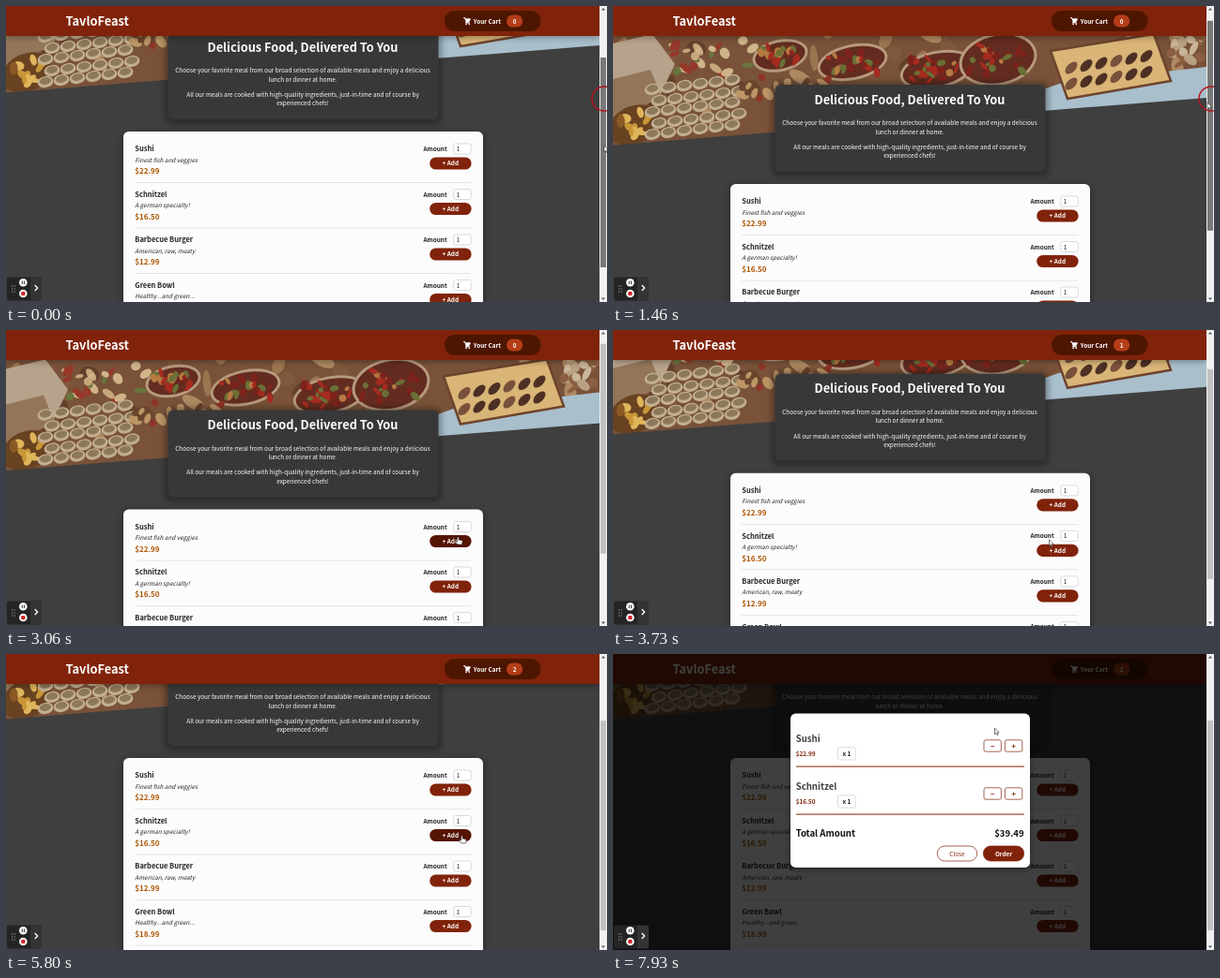
Animation of 640x316 px, one loop 8000 ms. Source, as an HTML page:

```html
<!DOCTYPE html>
<html lang="en">
<head>
<meta charset="utf-8">
<title>Food order</title>
<style>
html, body { margin: 0; width: 100%; height: 100%; overflow: hidden; background: #3f3f3f; }
svg { display: block; width: 100vw; height: 100vh; }
text { font: 6.4px "Noto Sans CJK JP", "Noto Sans CJK SC", "Noto Sans CJK", "Noto Sans", sans-serif; white-space: pre; }
.b { font-weight: 700; }
.i { font-style: italic; }
.mid { text-anchor: middle; }
.end { text-anchor: end; }
</style>
</head>
<body>
<svg id="stage" viewBox="0 0 640 316">
  <defs>
    <clipPath id="photoClip"><path d="M0-230H632V-92L0-41.5Z"/></clipPath>
    <filter id="soft" x="-20%" y="-30%" width="140%" height="160%"><feGaussianBlur stdDeviation="3.2"/></filter>
    <filter id="blur"><feGaussianBlur stdDeviation=".5"/></filter>
  </defs>
  <rect width="640" height="316" fill="#3f3f3f"/>
  <g id="page">
    <g clip-path="url(#photoClip)"><g id="photo" filter="url(#blur)"></g></g>
    <rect x="169" y="-109" width="295" height="101" rx="8" fill="#000" opacity=".3" filter="url(#soft)"/>
    <rect x="172.5" y="-106" width="288" height="93" rx="5.6" fill="#383838"/>
    <g id="intro"></g>
    <rect x="123" y="1" width="387" height="214" rx="6" fill="#000" opacity=".25" filter="url(#soft)"/>
    <rect x="125" width="383" height="212" rx="5.6" fill="#fcfcfc"/>
    <g id="menu"></g>
  </g>
  <rect y="2" width="632" height="32" fill="#000" opacity=".3" filter="url(#soft)"/>
  <rect width="632" height="32" fill="#80230a"/>
  <g id="header"></g>
  <rect id="backdrop" width="632" height="316" fill="#000" opacity=".75"/>
  <g id="modal"></g>
  <g id="scrollbar">
    <rect x="632" width="8" height="316" fill="#f1f1f1"/>
    <path d="M634 4.5 636 2 638 4.5ZM634 311.5 636 314 638 311.5Z" fill="#555"/>
    <rect id="thumb" x="633" width="6" height="224"/>
  </g>
  <g id="recorder">
    <rect x="1" y="289.5" width="37" height="25" rx="2" fill="#242424"/>
    <path d="M26 290V314H36.5A1.5 1.5 0 0 0 38 312.5V291.5A1.5 1.5 0 0 0 36.5 290Z" fill="#343434"/>
    <path d="M6 299h1m1.6 0h1M6 302h1m1.6 0h1M6 305h1m1.6 0h1" stroke="#bbb"/>
    <circle cx="18.3" cy="295.3" r="4.3" fill="#fff"/>
    <path d="M17.2 293.5v3.6m2.2-3.6v3.6" stroke="#333" stroke-width="1"/>
    <circle cx="18.3" cy="307" r="4.3" fill="#fff"/>
    <rect x="16.2" y="304.9" width="4.2" height="4.2" rx=".8" fill="#d8232a"/>
    <path d="M30.7 298 33.6 301 30.7 304" fill="none" stroke="#fff" stroke-width="1.3"/>
  </g>
  <circle id="ring" r="13" fill="none" stroke="#b3141f" stroke-width="1.5"/>
  <g id="pointer" fill="#fff" stroke="#222" stroke-width=".6" stroke-linejoin="round">
    <path id="arrow" d="M0 0V6.8L1.6 5.4 2.6 7.7 3.6 7.2 2.6 5H4.7Z"/>
    <path id="hand" d="M-.8.5Q0-.5.8.5V3L4 3.7Q4.8 4 4.6 5L4 8H-.7L-2.8 5Q-2.8 3.9-1.7 4.4L-.8 5Z"/>
  </g>
</svg>
<script>
const LOOP = 8000;
const RED = '#80230a', DARK_RED = '#4d1601';
const $ = id => document.getElementById(id);

function add(parent, tag, attrs, content) {
  const el = document.createElementNS('http://www.w3.org/2000/svg', tag);
  for (const key in attrs) el.setAttribute(key, attrs[key]);
  if (content !== undefined) el.textContent = content;
  parent.appendChild(el);
  return el;
}

function text(parent, x, y, content, fill, cls = '', size = 6.4) {
  return add(parent, 'text', { x, y, fill, class: cls, style: `font-size:${size}px` }, content);
}

function box(parent, x, y, width, height, rx, fill, stroke = 'none') {
  return add(parent, 'rect', { x, y, width, height, rx, fill, stroke, 'stroke-width': .7 });
}

function oval(parent, cx, cy, rx, ry, fill, turn = 0) {
  return add(parent, 'ellipse', { cx, cy, rx, ry, fill, transform: `rotate(${turn} ${cx} ${cy})` });
}

let seed = 11;
const random = () => (seed = seed * 16807 % 2147483647) / 2147483647;

function scatter(parent, count, x, y, w, h, size, colors) {
  for (let i = 0; i < count; i++) {
    oval(parent, x + random() * w, y + random() * h, size * (.6 + random()), size * (.4 + random() * .6),
      colors[Math.floor(random() * colors.length)], random() * 180);
  }
}

function buildPhoto() {
  const g = $('photo');
  box(g, 0, -230, 632, 200, 0, '#795239');
  scatter(g, 60, 0, -190, 632, 120, 9, ['#9b7450', '#63402c', '#80583d', '#ad8962']);
  add(g, 'path', { d: 'M0-150 42-160 66-128 48-90 0-78Z', fill: '#b7a28c' });
  add(g, 'path', { d: 'M0-112 40-122 52-92 0-70Z', fill: '#93765a' });
  scatter(g, 26, 50, -155, 100, 42, 5, ['#c5a77b', '#96382a', '#68753c', '#d0b48a']);
  oval(g, 22, -63, 28, 20, '#684221', -25);
  scatter(g, 12, 2, -78, 40, 28, 5, ['#c89538', '#8b5925', '#dfb65c']);
  for (let row = 0; row < 5; row++) for (let col = 0; col < 6; col++) {
    const x = 42 + col * 17 + row % 2 * 7, y = -101 + row * 12 - col * 2;
    oval(g, x, y, 8.5, 6, '#c2ae91', -12);
    oval(g, x, y - 1, 6.2, 3.8, '#8e785b', -12);
  }
  for (const [x, y, rx, ry] of [[178, -137, 30, 17], [255, -130, 38, 19], [345, -122, 40, 20], [410, -133, 42, 28]]) {
    oval(g, x, y, rx, ry, '#b69a7e', -12);
    oval(g, x, y, rx - 3, ry - 3, '#632c20', -12);
    scatter(g, 24, x - rx * .75, y - ry * .6, rx * 1.5, ry * 1.2, 4, ['#a52b20', '#7d231c', '#b67a42', '#6a7036']);
  }
  scatter(g, 20, 130, -115, 110, 25, 5, ['#bd9666', '#6b442c', '#8e3527']);
  add(g, 'path', { d: 'M445-96 475-107 632-125V-60H430Z', fill: '#a9bfcc' });
  add(g, 'path', { d: 'M466-142 576-160 594-110 484-91Z', fill: '#d9b577', stroke: '#6d432d', 'stroke-width': 2.5 });
  for (let i = 0; i < 12; i++) {
    oval(g, 488 + i % 6 * 16, -124 + Math.floor(i / 6) * 17 - i % 6 * 2.5, 8, 4.5, i % 3 ? '#4d3024' : '#79503b', -45);
  }
  scatter(g, 18, 590, -160, 42, 32, 6, ['#b8a082', '#c9b59a', '#8b5e41']);
}

function buildIntro() {
  const g = $('intro');
  text(g, 316, -85.4, 'Delicious Food, Delivered To You', '#fff', 'b mid', 12.8);
  ['Choose your favorite meal from our broad selection of available meals and enjoy a delicious',
    'lunch or dinner at home.',
    'All our meals are cooked with high-quality ingredients, just-in-time and of course by',
    'experienced chefs!'
  ].forEach((line, i) => text(g, 316, [-63, -53.5, -37.3, -27.8][i], line, '#fff', 'mid'));
}

function buildMenu() {
  const meals = [
    ['Sushi', 'Finest fish and veggies', '$22.99'],
    ['Schnitzel', 'A german specialty!', '$16.50'],
    ['Barbecue Burger', 'American, raw, meaty', '$12.99'],
    ['Green Bowl', 'Healthy...and green...', '$18.99']
  ];
  return meals.map(([name, note, price], i) => {
    const g = add($('menu'), 'g', { transform: `translate(0 ${i * 48.5})` });
    text(g, 137.3, 21.4, name, '#222', 'b', 7.5);
    text(g, 137.3, 32.6, note, '#222', 'i');
    text(g, 137.3, 45.3, price, '#ad5502', 'b', 8);
    text(g, 444.5, 21, 'Amount', '#222', 'b');
    box(g, 476.8, 13, 18.4, 11, 2, '#fff', '#ccc');
    text(g, 479.8, 21, '1', '#222');
    const button = box(g, 451.2, 27.4, 44.4, 13.2, 6.6, RED);
    text(g, 473.3, 36.3, '+ Add', '#fff', 'b mid');
    box(g, 137, 54.3, 358.5, .5, 0, '#ccc');
    return button;
  });
}

function buildHeader() {
  const g = $('header');
  text(g, 63.5, 21.4, 'TavloFeast', '#fff', 'b', 12.8);
  const pill = box(g, 467, 5, 102.5, 22, 11, DARK_RED);
  add(g, 'path', { d: 'M487 12.5h1.5l1.6 4.3h3l1.3-3h-5.2M490 16.8l-.6 1.2h4.6', fill: '#fff', stroke: '#fff', 'stroke-width': .9 });
  oval(g, 490, 19.4, .8, .8, '#fff');
  oval(g, 493.3, 19.4, .8, .8, '#fff');
  text(g, 497.8, 18.5, 'Your Cart', '#fff', 'b');
  const badge = add(g, 'g', {});
  box(badge, -8.6, -6.6, 17.2, 13.2, 6.6, '#b43e18');
  return { pill, badge, count: text(badge, 0, 2.5, '0', '#fff', 'b mid') };
}

function buildModal() {
  const g = $('modal');
  add(g, 'rect', { x: 189, y: 66, width: 255, height: 164, rx: 6, opacity: .4, filter: 'url(#soft)' });
  box(g, 189, 63.5, 255, 164.5, 5.6, '#fff');
  [['Sushi', '$22.99'], ['Schnitzel', '$16.50']].forEach(([name, price], i) => {
    const item = add(g, 'g', { transform: `translate(0 ${i * 51})` });
    text(item, 194.7, 93.6, name, '#3f3f3f', 'b', 9.6);
    text(item, 194.7, 109, price, RED, 'b');
    box(item, 239.4, 99.8, 18.8, 13.2, 2, '#fff', '#ccc');
    text(item, 248.9, 109, 'x 1', '#222', 'b mid');
    [[395, '−'], [417.4, '+']].forEach(([x, sign]) => {
      box(item, x, 91.8, 18.4, 12.4, 2, '#fff', RED);
      text(item, x + 9.2, 100.6, sign, RED, 'b mid', 7.5);
    });
    box(item, 195, 119.6, 243, 1, 0, RED);
  });
  text(g, 194.7, 195.3, 'Total Amount', '#111', 'b', 9.6);
  text(g, 437.6, 195.3, '$39.49', '#111', 'b end', 9.6);
  box(g, 345.3, 205, 42.4, 16, 8, '#fff', RED);
  text(g, 366.5, 215.5, 'Close', RED, 'mid');
  box(g, 394.3, 205, 43.4, 16, 8, RED, RED);
  text(g, 416, 215.5, 'Order', '#fff', 'b mid');
}

buildPhoto();
buildIntro();
const addButtons = buildMenu();
const cart = buildHeader();
buildModal();

// Keys are [time, ...values]
const pageKeys = [[0, 134], [60, 134], [530, 98], [930, 98], [1430, 190], [1500, 190], [1730, 191.5], [3400, 191.5], [4080, 111]];
const pointerKeys = [
  [0, 637, 149], [60, 637, 149], [530, 636, 176], [930, 636, 176], [1430, 633, 103], [1730, 633, 104],
  [2130, 590, 150], [2600, 585, 155], [3000, 481.5, 221], [3400, 481.5, 221], [4100, 444.5, 227],
  [4260, 444.5, 227], [4860, 485.5, 194], [6260, 485.5, 194], [7000, 521, 15.5], [7200, 521, 15.5], [7860, 406.5, 79]
];
const clicks = [[0, 1700, 637, 99], [3100, 3260, 481.5, 222], [5130, 5400, 485.5, 195], [7060, 7200, 521, 16.5]];
const cartTimes = [3130, 5400];

const between = (t, a, b) => t >= a && t < b;
const show = (el, on) => el.setAttribute('display', on ? 'inline' : 'none');

function track(keys, t) {
  const next = keys.findIndex(key => key[0] > t);
  if (next < 0) return keys[keys.length - 1].slice(1);
  const a = keys[next - 1], b = keys[next];
  const u = (t - a[0]) / (b[0] - a[0]), e = u * u * (3 - 2 * u);
  return a.slice(1).map((v, i) => v + (b[i + 1] - v) * e);
}

function bump(t) {
  const last = cartTimes.filter(time => time <= t).pop();
  const u = (t - last) / 300;
  return u < 1 ? 1 + .1 * Math.sin(Math.PI * u) : 1;
}

function draw(t) {
  const [top] = track(pageKeys, t);
  $('page').setAttribute('transform', `translate(0 ${top})`);
  $('thumb').setAttribute('y', 55 + (134 - top) * .7);
  $('thumb').setAttribute('fill', t < 1700 ? '#787878' : '#c1c1c1');

  const hovers = [between(t, 2930, 3520), between(t, 4780, 6340)];
  hovers.forEach((on, i) => addButtons[i].setAttribute('fill', on ? '#551402' : RED));
  const onCart = between(t, 6880, 7260);
  cart.pill.setAttribute('fill', onCart ? '#2c0d00' : DARK_RED);
  cart.count.textContent = cartTimes.filter(time => time <= t).length;
  cart.badge.setAttribute('transform', `translate(541.6 16) scale(${bump(t)})`);

  show($('backdrop'), t >= 7130);
  const u = Math.min(1, Math.max(0, (t - 7140) / 300)), eased = 1 - (1 - u) ** 2;
  $('modal').setAttribute('opacity', eased);
  $('modal').setAttribute('transform', `translate(0 ${-19.2 * (1 - eased)})`);

  const [x, y] = track(pointerKeys, t);
  $('pointer').setAttribute('transform', `translate(${x} ${y})`);
  const isHand = hovers[0] || hovers[1] || onCart;
  show($('hand'), isHand);
  show($('arrow'), !isHand);

  const click = clicks.find(([from, to]) => between(t, from, to));
  show($('ring'), click);
  if (click) $('ring').setAttribute('transform', `translate(${click[2]} ${click[3]})`);
}

const start = performance.now();
function frame() {
  draw((performance.now() - start) % LOOP);
  requestAnimationFrame(frame);
}
frame();
</script>
</body>
</html>
```
